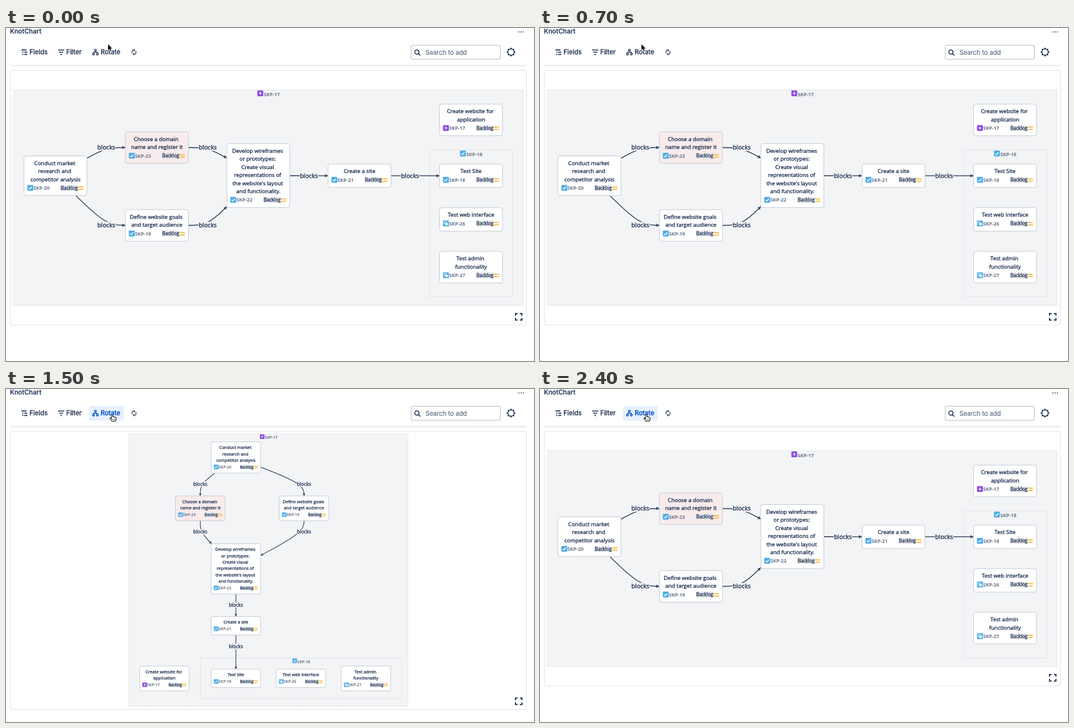
An HTML page with a canvas for the animation above (2.5 s loop, 942x595 px).

```html
<!DOCTYPE html>
<html lang="en">
<head>
<meta charset="utf-8">
<title>KnotChart</title>
<style>
  html, body { margin: 0; width: 100%; height: 100%; overflow: hidden; background: #fff; }
  canvas { display: block; width: 942px; height: 595px; }
</style>
</head>
<body>
<canvas id="stage"></canvas>
<script>
const W = 942, H = 595, LOOP = 2500;
const canvas = document.getElementById('stage');
const ctx = canvas.getContext('2d');
const dpr = window.devicePixelRatio || 1;
canvas.width = W * dpr;
canvas.height = H * dpr;

const UI = 'Inter, "Liberation Sans", sans-serif';
const CARD = '"Open Sans", "Noto Sans", sans-serif';
const INK = '#172b4d', TOOL = '#2c3e5d', LINE = '#3b4763', GROUP = '#f3f4f6';
const CARD_W = 112.4;

const issues = {
  20: { lines: ['Conduct market', 'research and', 'competitor analysis'], wide: [32, 228.5], tall: [366, 94.5] },
  23: { lines: ['Choose a domain', 'name and register it'], fill: '#f8ebeb', wide: [213, 185.5], tall: [302.5, 191] },
  19: { lines: ['Define website goals', 'and target audience'], wide: [213, 324.5], tall: [487.5, 191] },
  22: { lines: ['Develop wireframes', 'or prototypes:', 'Create visual', 'representations of', "the website's layout", 'and functionality.'],
        wide: [394, 206.5], tall: [366, 276.5] },
  21: { lines: ['Create a site'], wide: [574.5, 243], tall: [366, 406.5] },
  18: { lines: ['Test Site'], wide: [773.5, 243], tall: [366, 500.5] },
  17: { lines: ['Create website for', 'application'], type: 'epic', wide: [773.5, 136], tall: [238.5, 495] },
  26: { lines: ['Test web interface'], type: 'sub', wide: [773.5, 321], tall: [482, 500.5] },
  27: { lines: ['Test admin', 'functionality'], type: 'sub', wide: [773.5, 399], tall: [598, 495] }
};

// edges: from, to, label centre
const layouts = {
  wide: {
    scale: 1, bottom: 530,
    groups: [[13.5, 110.5, 909, 385], [755.5, 217.5, 148.5, 263]],
    tags: [[448.5, 111.5, 17, 'epic'], [810, 219, 18]],
    edges: [
      [20, 23, 179, 213.5], [20, 19, 179, 352.5], [23, 22, 360, 213.5],
      [19, 22, 360, 352.5], [22, 21, 540.5, 264], [21, 18, 721, 264]
    ]
  },
  tall: {
    scale: 0.785, bottom: 572,
    groups: [[219, 80.5, 498, 486.5], [346.5, 480.5, 359, 72.5]],
    tags: [[453, 81, 17, 'epic'], [511, 481.5, 18]],
    edges: [
      [20, 23, 346.5, 170], [20, 19, 531.7, 170], [23, 22, 346.5, 255.5],
      [19, 22, 531.7, 255.5], [22, 21, 410.2, 386], [21, 18, 410.2, 460]
    ]
  }
};

// heft adds a thin outline, for strokes between regular and bold
function text(str, x, y, font, color, { align = 'left', heft = 0 } = {}) {
  ctx.font = font;
  ctx.fillStyle = ctx.strokeStyle = color;
  ctx.textAlign = align;
  ctx.fillText(str, x, y);
  if (heft) {
    ctx.lineWidth = heft;
    ctx.strokeText(str, x, y);
  }
}

function box(x, y, w, h, r, fill, stroke, lw = 1) {
  ctx.beginPath();
  ctx.roundRect(x, y, w, h, r);
  if (fill) { ctx.fillStyle = fill; ctx.fill(); }
  if (stroke) { ctx.strokeStyle = stroke; ctx.lineWidth = lw; ctx.stroke(); }
}

function stroke(d, color, lw) {
  ctx.strokeStyle = color;
  ctx.lineWidth = lw;
  ctx.stroke(new Path2D(d));
}

function fill(d, color) {
  ctx.fillStyle = color;
  ctx.fill(new Path2D(d));
}

function at(x, y, s, draw) {
  ctx.save();
  ctx.translate(x, y);
  ctx.scale(s, s);
  draw();
  ctx.restore();
}

function typeIcon(x, y, type) {
  at(x, y, 1, () => {
    box(0, 0, 10.4, 10.4, 1.3, type === 'epic' ? '#904ee2' : '#4bade8');
    if (type === 'epic') {
      fill('M5.8 1.8 L2.7 5.8 H4.9 L4.5 8.7 L7.7 4.6 H5.4 Z', '#fff');
    } else if (type === 'sub') {
      box(2.2, 2.2, 4, 4, 0.5, null, '#fff', 1);
      box(4.3, 4.3, 4.2, 4.2, 0.5, '#fff');
    } else {
      stroke('M2.5 5.4 L4.4 7.4 L8 3.1', '#fff', 1.5);
    }
  });
}

function key(id, x, y) {
  text('SKP-' + id, x, y, 'bold 8.7px ' + CARD, '#6b778c');
}

const cardHeight = id => 27.6 + 14.45 * issues[id].lines.length;

function card(id, mode, s) {
  const c = issues[id], last = c.lines.length - 1, h = cardHeight(id);
  at(...c[mode], s, () => {
    box(0, 0, CARD_W, h, 4, c.fill || '#fff', '#c3c8d0', 1 / s);
    c.lines.forEach((line, i) => {
      const x = CARD_W / 2 - (i < last ? 1.3 : 0);
      text(line, x, 16.3 + 14.45 * i, '9.8px ' + CARD, INK, { align: 'center', heft: 0.35 });
    });
    const m = h - 13.5;
    typeIcon(6.2, m - 5.5, c.type);
    key(id, 17, m + 3);
    box(65, m - 5, 31.5, 10, 1.5, '#dfe1e6');
    text('Backlog', 65.8, m + 2.9, '8.4px ' + CARD, '#253858', { heft: 0.35 });
    ctx.fillStyle = '#f5b52e';
    ctx.fillRect(97, m - 2.8, 9, 1.8);
    ctx.fillRect(97, m + 1.3, 9, 1.8);
  });
}

// Where the line from a card's centre towards p leaves the card
function border(id, mode, s, p) {
  const [x, y] = issues[id][mode];
  const hw = CARD_W * s / 2, hh = cardHeight(id) * s / 2;
  const cx = x + hw, cy = y + hh, dx = p[0] - cx, dy = p[1] - cy;
  const k = Math.min(hw / Math.abs(dx), hh / Math.abs(dy));
  return [cx + dx * k, cy + dy * k];
}

// Cubic B-spline through start, label and end
function edge([from, to, ...mid], mode, s) {
  const a = border(from, mode, s, mid), b = border(to, mode, s, mid);
  const mix = (i, j, k) => a.map((v, n) => (i * v + j * mid[n] + k * b[n]) / 6);
  ctx.beginPath();
  ctx.moveTo(...a);
  ctx.lineTo(...mix(5, 1, 0));
  ctx.bezierCurveTo(...mix(4, 2, 0), ...mix(2, 4, 0), ...mix(1, 4, 1));
  ctx.bezierCurveTo(...mix(0, 4, 2), ...mix(0, 2, 4), ...mix(0, 1, 5));
  ctx.lineTo(...b);
  ctx.strokeStyle = LINE;
  ctx.lineWidth = 1.6 * s;
  ctx.stroke();
  at(...b, s, () => {
    ctx.rotate(Math.atan2(b[1] - mid[1], b[0] - mid[0]));
    fill('M0 0 L-5.5 -3 V3 Z', LINE);
  });
  at(...mid, s, () => {
    ctx.fillStyle = GROUP;
    ctx.fillRect(-16.5, -6, 33, 12);
    text('blocks', 0, 3.6, '10.9px ' + CARD, INK, { align: 'center', heft: 0.35 });
  });
}

function graph(mode) {
  const g = layouts[mode], s = g.scale;
  box(8, 75.5, 920.5, g.bottom - 75, 2.5, '#fff', '#dfe1e6');
  for (const r of g.groups) {
    ctx.fillStyle = GROUP;
    ctx.fillRect(...r);
    ctx.setLineDash([2, 1]);
    ctx.strokeStyle = '#d9dce1';
    ctx.lineWidth = 1;
    ctx.strokeRect(...r);
    ctx.setLineDash([]);
  }
  for (const [x, y, id, type] of g.tags) {
    at(x, y, s, () => {
      typeIcon(0, 0, type);
      key(id, 11.3, 10.4);
    });
  }
  g.edges.forEach(e => edge(e, mode, s));
  Object.keys(issues).forEach(id => card(id, mode, s));
  at(908, g.bottom - 20.7, 1, () => {
    stroke('M1 4.7V1H4.7 M8.8 1H12.5V4.7 M12.5 8.8V12.5H8.8 M4.7 12.5H1V8.8', INK, 1.9);
  });
}

function gear(x, y) {
  at(x, y, 1, () => {
    ctx.beginPath();
    for (let i = 0; i < 32; i++) {
      const a = (i - 1.5) * Math.PI / 16;
      const r = i % 4 === 1 || i % 4 === 2 ? 7.7 : 6.3;
      ctx.lineTo(r * Math.cos(a), r * Math.sin(a));
    }
    ctx.closePath();
    ctx.moveTo(4.8, 0);
    ctx.arc(0, 0, 4.8, 0, 2 * Math.PI);
    ctx.fillStyle = TOOL;
    ctx.fill('evenodd');
  });
}

function toolbar(hover) {
  const label = (str, x, color) => text(str, x, 47.3, '500 11.4px ' + UI, color, { heft: 0.3 });
  text('KnotChart', 7, 10.4, '600 11.3px ' + UI, INK);
  for (const x of [915, 919, 923]) box(x - 1, 6, 2, 2, 1, TOOL);

  stroke('M27.5 39.3H36.5 M29 43.3H31 M32.5 43.3H38 M29 47.3H31 M32.5 47.3H38', TOOL, 2);
  label('Fields', 42, TOOL);
  stroke('M93 39.3H104 M95 43.3H102 M97 47.3H100', TOOL, 1.7);
  label('Filter', 107.5, TOOL);

  if (hover) box(148, 30, 62, 26.5, 3, hover);
  const c = hover ? '#0052cc' : TOOL;
  stroke('M159.5 41V43.5 M156 45V43.3H163V45', c, 1.2);
  for (const [x, y] of [[158, 38.3], [154.6, 45], [161.5, 45]]) box(x, y, 3, 3, 0.5, null, c, 1.4);
  label('Rotate', 169, c);

  stroke('M225 45.5V41.5 A1.8 1.8 0 0 1 226.8 39.7H229.5 M231.8 41V45 A1.8 1.8 0 0 1 230 46.8H227.3', TOOL, 1.3);
  stroke('M228 37.9 L229.8 39.7 L228 41.5 M228.8 45 L227 46.8 L228.8 48.6', TOOL, 1.2);

  box(723, 30.8, 159, 25, 3, '#fff', '#d0d4dc', 1.7);
  ctx.lineCap = 'round';
  stroke('M736.9 43 A3.8 3.8 0 1 1 729.3 43 A3.8 3.8 0 1 1 736.9 43 M736 46 L738.6 48.6', INK, 1.6);
  ctx.lineCap = 'butt';
  text('Search to add', 748.5, 48, '11.2px ' + UI, '#5e6c84', { heft: 0.2 });
  gear(901, 43);

  ctx.fillStyle = '#e2e4e9';
  ctx.fillRect(8, 66.3, 921, 1.5);
  ctx.fillStyle = '#f3f4f6';
  ctx.fillRect(8, 67.8, 921, 1);
}

function cursor(x, y, hand) {
  ctx.lineJoin = 'round';
  at(x, y, 1, () => {
    if (hand) {
      const d = 'M-1.2 2 C-1.2 -.4 1.2 -.4 1.3 1.8 L1.6 5 C2.4 4.2 3.6 4.5 3.7 5.4 C4.7 4.8 5.6 5.2 5.8 6 ' +
        'C7 5.6 7.6 6.5 7.5 7.6 C7.5 10 6.6 10.6 6.4 13 H.2 C-.2 11.3 -2.4 9.7 -3.4 8 C-4 6.7 -2.4 6.1 -1.4 7.3 L-.5 8.2 Z';
      fill(d, '#fff');
      stroke(d, '#111', 1.1);
      stroke('M1.6 8.7V11 M3.3 8.7V11 M5 8.7V11', '#111', 0.7);
    } else {
      const d = 'M0 0 V10.8 L2.4 8.5 L4.1 12.4 L5.9 11.6 L4.2 7.8 H7.5 Z';
      stroke(d, '#fff', 1.8);
      fill(d, '#111');
    }
  });
  ctx.lineJoin = 'miter';
}

function pointer(t) {
  if (t < 500) return [182, 29, false];
  if (t < 900) return [181, 29, false];
  if (t < 1000) return [183.5, 36, true];
  if (t < 1100) return [187.5, 43, true];
  return [189, 44.8, true];
}

function hoverFill(t) {
  if (t < 900) return null;
  if (t < 1000) return '#f2f7ff';
  return t >= 1200 && t < 1500 ? '#deebff' : '#e7f0fe';
}

function render(t) {
  ctx.setTransform(dpr, 0, 0, dpr, 0, 0);
  ctx.fillStyle = '#fff';
  ctx.fillRect(0, 0, W, H);
  toolbar(hoverFill(t));
  graph(t >= 1200 && t < 1900 ? 'tall' : 'wide');
  cursor(...pointer(t));
}

const start = performance.now();
function tick() {
  render((performance.now() - start) % LOOP);
  requestAnimationFrame(tick);
}
tick();
</script>
</body>
</html>
```
